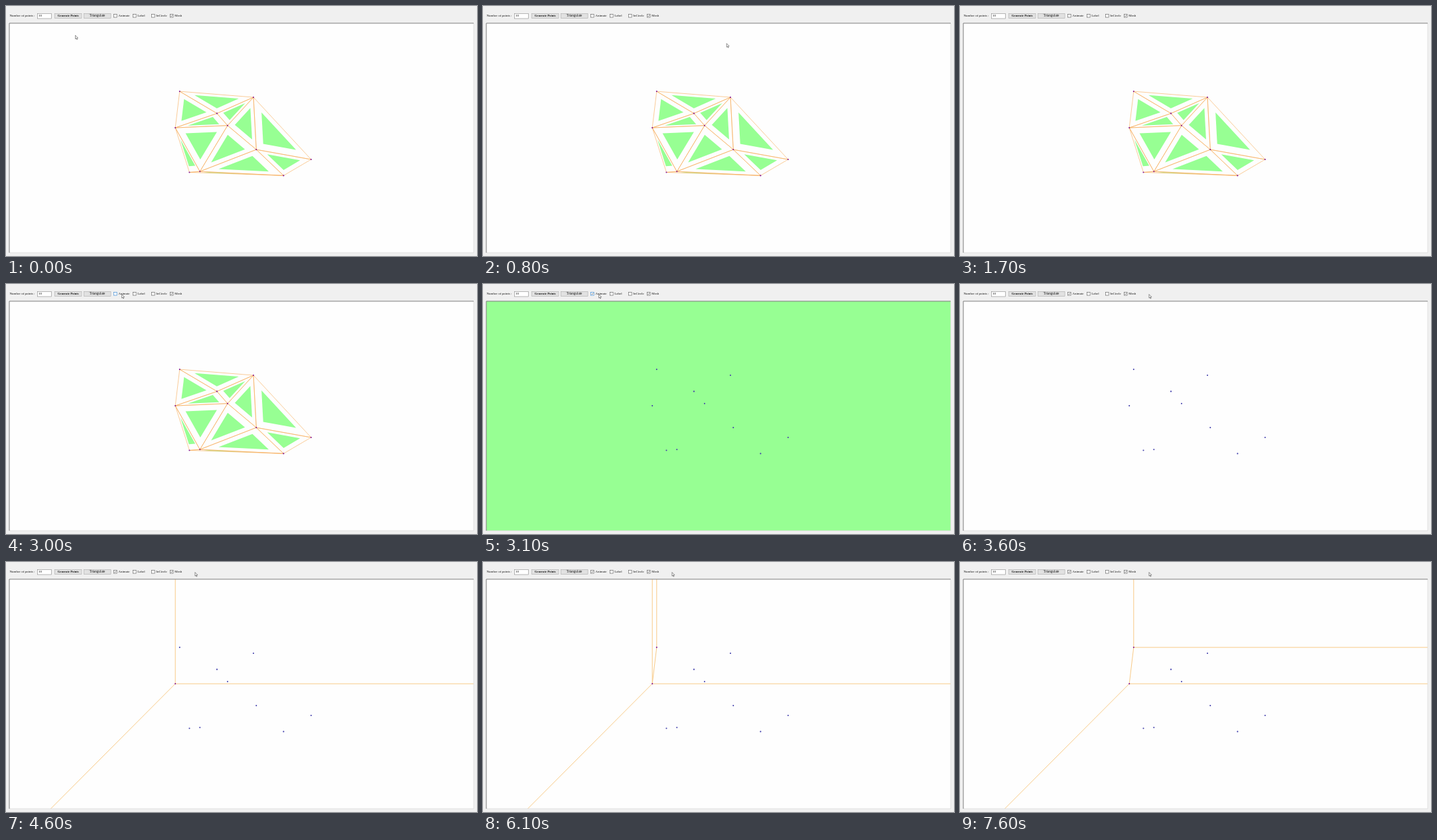
Write an HTML page with a canvas that moves like this. It is 710x378 px and loops after 8 s.

```html
<!DOCTYPE html>
<html lang="en">
<head>
<meta charset="utf-8">
<title>Triangulation</title>
<style>
  html, body { margin: 0; height: 100%; overflow: hidden; background: #f0f0f0; }
  canvas { display: block; }
</style>
</head>
<body>
<canvas id="stage" width="710" height="378"></canvas>
<script>
const ctx = document.getElementById('stage').getContext('2d');
const LOOP = 8000, CLICK = 3100, CLEAR = 3600;
const LEFT = 5, TOP = 26, RIGHT = 705, BOTTOM = 373;
const GREEN = '#97ff93', ORANGE = '#f7aa55', PALE = '#f8c47a';
const BLUE = '#4340ac', PURPLE = '#861a98';

const points = [
  [261.8, 129.1], [373, 138], [318, 162.4], [255.2, 184.1], [334, 180.7],
  [377.3, 217.1], [459.9, 232], [418.4, 256.4], [292.3, 250.2], [276.5, 251.5]
];
const [A, , , D] = points;
const ARROW = new Path2D('M0 0v5.6l1.3-1.1.9 2 .8-.4-.8-1.9 1.7-.2z');

const distance = (p, q) => Math.hypot(p[0] - q[0], p[1] - q[1]);

function circumcenter(a, b, c) {
  const bx = b[0] - a[0], by = b[1] - a[1], cx = c[0] - a[0], cy = c[1] - a[1];
  const b2 = bx * bx + by * by, c2 = cx * cx + cy * cy, d = 2 * (bx * cy - by * cx);
  return [a[0] + (cy * b2 - by * c2) / d, a[1] + (bx * c2 - cx * b2) / d];
}

// Delaunay: keep each triangle whose circumcircle holds no other point
function triangulate(pts) {
  const found = [];
  pts.forEach((a, i) => pts.slice(i + 1).forEach((b, j) => pts.slice(i + j + 2).forEach(c => {
    const center = circumcenter(a, b, c), radius = distance(center, a);
    if (pts.every(p => p === a || p === b || p === c || distance(center, p) > radius)) found.push([a, b, c]);
  })));
  return found;
}
const triangles = triangulate(points);

function trace(path) {
  ctx.beginPath();
  path.forEach(p => ctx.lineTo(...p));
}

function line(color, width, ...path) {
  trace(path);
  ctx.strokeStyle = color;
  ctx.lineWidth = width;
  ctx.stroke();
}

function box(x, y, w, h, fill, stroke) {
  ctx.fillStyle = fill;
  ctx.fillRect(x, y, w, h);
  ctx.strokeStyle = stroke;
  ctx.lineWidth = 0.6;
  ctx.strokeRect(x, y, w, h);
}

function text(str, x, font = '5px') {
  ctx.font = `${font} "Liberation Serif", serif`;
  ctx.fillStyle = '#111';
  ctx.fillText(str, x, 16.1);
}

function button(label, x, font) {
  box(x, 11.4, 40.5, 7.2, '#e1e1e1', '#adadad');
  text(label, x + 4.2 + (label.length < 12 ? 4 : 0), font);
}

function checkbox(label, x, checked, hover) {
  box(x, 12.5, 4.6, 4.6, '#fff', hover ? '#2a7fd0' : '#555');
  if (checked) line('#333', 0.6, [x + 1, 14.8], [x + 2, 15.9], [x + 3.8, 13.6]);
  text(label, x + 6.8);
}

function toolbar(t) {
  text('Number of points :', 5.5);
  box(47.5, 11.3, 21, 7.7, '#fff', '#888');
  text('10', 49);
  button('Generate Points', 73.5, 'bold 4.66px');
  button('Triangulate', 117.5, '5.2px');
  checkbox('Animate', 162.5, t >= CLICK, t >= 2900 && t < 3300);
  checkbox('Label', 191.5);
  checkbox('InCircle', 219.5);
  checkbox('Mesh', 247.4, true);
}

function mesh() {
  ctx.fillStyle = GREEN;
  for (const corners of triangles) {
    const mid = [0, 1].map(i => corners.reduce((sum, p) => sum + p[i] / 3, 0));
    trace(corners.map(p => p.map((n, i) => mid[i] + (n - mid[i]) * 0.6)));
    ctx.fill();
  }
  for (const [a, b, c] of triangles) line(ORANGE, 0.6, a, b, c, a);
}

function construction(t) {
  const step = (from, ...path) => t >= from && line(PALE, 0.9, ...path);
  if (t < 7600) step(4100, [D[0], TOP], D);
  step(4100, D, [RIGHT, D[1]]);
  step(4600, D, [67.5, BOTTOM]);
  step(6100, [A[0], TOP], A, D);
  step(6600, A, [RIGHT, A[1]]);
}

function dots(t) {
  for (const p of points) {
    const joined = t < CLICK || p === D && t >= 4100 || p === A && t >= 6100;
    ctx.fillStyle = joined ? PURPLE : BLUE;
    ctx.beginPath();
    ctx.arc(...p, 1.05, 0, 7);
    ctx.fill();
  }
}

function pointer(t) {
  if (t >= 1700 && t < 2300) return;
  let x = 104.6, y = 44.3;
  const move = (start, end, dx, dy, sway = 0) => {
    const u = Math.min(1, Math.max(0, (t - start) / (end - start)));
    const eased = u * u * (3 - 2 * u);
    x += dx * eased;
    y += dy * eased - sway * Math.sin(2 * Math.PI * eased);
  };
  move(100, 1100, 335, 7, 7);
  move(1200, 1600, 3, 4);
  move(2200, 2900, -268, -39.7);
  move(3200, 3500, 110.4, 0);

  ctx.save();
  ctx.translate(x, y);
  ctx.fillStyle = '#fff';
  ctx.fill(ARROW);
  ctx.strokeStyle = '#444';
  ctx.lineWidth = 0.6;
  ctx.stroke(ARROW);
  ctx.restore();
}

function draw(t) {
  ctx.fillStyle = '#f0f0f0';
  ctx.fillRect(0, 0, 710, 378);
  toolbar(t);

  ctx.fillStyle = t >= CLICK && t < CLEAR ? GREEN : '#fefefe';
  ctx.fillRect(LEFT, TOP, RIGHT - LEFT, BOTTOM - TOP);
  if (t < CLICK) mesh(); else construction(t);
  dots(t);
  line('#dcdcdc', 0.8, [LEFT, BOTTOM], [RIGHT, BOTTOM], [RIGHT, TOP]);
  line('#7c7c7c', 1, [LEFT, BOTTOM], [LEFT, TOP], [RIGHT, TOP]);

  pointer(Math.floor(t / 100) * 100);
}

function frame() {
  draw(performance.now() % LOOP);
  requestAnimationFrame(frame);
}
frame();
</script>
</body>
</html>
```
